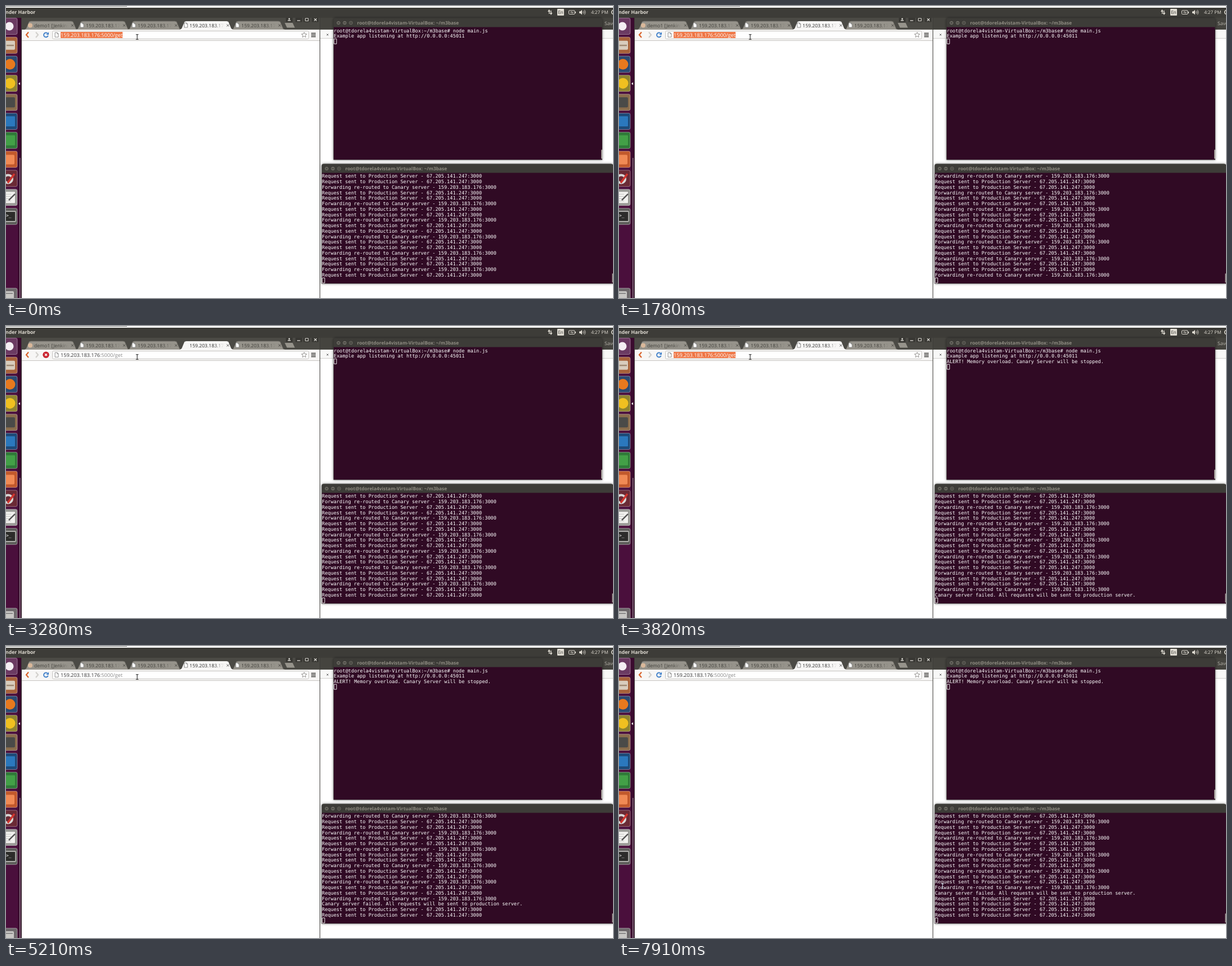
An HTML page with a canvas that plays this animation: 1078 by 519 pixels, repeating every 8 s.

```html
<!DOCTYPE html>
<html lang="en">
<head>
<meta charset="utf-8">
<title>Canary release demo</title>
<style>
html, body { margin: 0; width: 100%; height: 100%; overflow: hidden; background: #fff; }
canvas { display: block; }
</style>
</head>
<body>
<canvas id="stage" width="1078" height="519"></canvas>
<script>
const ctx = document.getElementById('stage').getContext('2d');
ctx.textRendering = 'geometricPrecision';

const LOOP = 8000;
const SANS = '"Open Sans", "Noto Sans", sans-serif';
const MONO = '"DejaVu Sans Mono", monospace';
const BAR = '#3d3c38', PURPLE = '#300a24';
const HOST = 'root@tdorela4vistam-VirtualBox:';
const IP = '159.203.183.176';
const ROW = 9.75, FAIL_LINE = 24, ALERT_AT = 3820;

// Address bar state over time
const ADDRESS = [
  [0, 'selected'], [710, 'caret'], [990, 'plain'], [1130, 'selected'],
  [1390, 'loading'], [1510, 'plain'], [1780, 'selected'], [1900, 'caret'],
  [2330, 'plain'], [2460, 'selected'], [2600, 'plain'], [2730, 'caret'],
  [2880, 'plain'], [3030, 'selected'], [3280, 'loading'], [3420, 'plain'],
  [3550, 'selected'], [4100, 'loading'], [4230, 'plain'], [4790, 'selected'],
  [5070, 'loading'], [5210, 'plain'], [5330, 'caret'], [5460, 'selected'],
  [5730, 'loading'], [5870, 'plain'], [6120, 'selected'], [6840, 'loading'],
  [6970, 'plain']
];
// Moments at which a new log line arrives
const LOG_TIMES = [710, 1510, 1900, 2730, 3420, 3820, 4230, 5210, 5870, 6970];
// Pointer: time, x, y
const POINTER = [
  [0, 233, 55], [7270, 300, 112], [7390, 430, 230], [7520, 556, 344],
  [7640, 639, 415], [7790, 612, 461], [7910, 574.5, 427]
];

const latest = (list, t) => list.filter(e => e[0] <= t).pop();

function rect(x, y, w, h, color) {
  ctx.fillStyle = color;
  ctx.fillRect(x, y, w, h);
}

function round(x, y, w, h, r, fill, stroke, lw = 1) {
  ctx.beginPath();
  ctx.roundRect(x, y, w, h, r);
  if (fill) { ctx.fillStyle = fill; ctx.fill(); }
  if (stroke) { ctx.strokeStyle = stroke; ctx.lineWidth = lw; ctx.stroke(); }
}

function disc(x, y, r, fill, stroke, lw = 1) {
  ctx.beginPath();
  ctx.arc(x, y, r, 0, Math.PI * 2);
  if (fill) { ctx.fillStyle = fill; ctx.fill(); }
  if (stroke) { ctx.strokeStyle = stroke; ctx.lineWidth = lw; ctx.stroke(); }
}

function trace(points) {
  ctx.beginPath();
  points.forEach(([x, y], i) => i ? ctx.lineTo(x, y) : ctx.moveTo(x, y));
}

function poly(points, color) {
  trace(points);
  ctx.closePath();
  ctx.fillStyle = color;
  ctx.fill();
}

function line(points, color, lw = 1) {
  trace(points);
  ctx.strokeStyle = color;
  ctx.lineWidth = lw;
  ctx.stroke();
}

function cross(x, y, r, color, lw = 1) {
  line([[x - r, y - r], [x + r, y + r]], color, lw);
  line([[x + r, y - r], [x - r, y + r]], color, lw);
}

function text(s, x, y, size, color, family = SANS, weight = 400) {
  ctx.font = `${weight} ${size}px ${family}`;
  ctx.fillStyle = color;
  ctx.fillText(s, x, y);
}

const mono = (s, x, y) => text(s, x, y, 8.582, '#fff', MONO);

function page(x, y) {
  poly([[x - 3, y - 4], [x + 1, y - 4], [x + 3, y - 2], [x + 3, y + 4], [x - 3, y + 4]], '#fbfbfa');
  line([[x + 1, y - 4], [x - 3, y - 4], [x - 3, y + 4], [x + 3, y + 4], [x + 3, y - 2], [x + 1, y - 4], [x + 1, y - 2], [x + 3, y - 2]], '#777', .8);
}

function topBar() {
  rect(0, 0, 1078, 4, '#fff');
  rect(0, 0, 215, 1, '#777');
  rect(0, 3, 1078, 18, BAR);
  text('nder Harbor', -1, 14, 8.7, '#dfdbd2', SANS, 700);
  const c = '#dfdbd2';
  poly([[962, 10], [964.5, 6], [967, 10]], c);
  rect(964, 9, 1.3, 5, c);
  poly([[965.5, 12], [968, 16], [970.5, 12]], c);
  rect(967.3, 8, 1.3, 5, c);
  round(979, 5, 12, 12, 1, c);
  text('En', 980.4, 14, 8, BAR);
  round(999.5, 8, 10.5, 6.5, 1, null, c);
  rect(1010.5, 10, 1.5, 3, c);
  line([[1002, 11.5], [1005, 10], [1005, 12.5], [1008, 11]], c, .9);
  poly([[1018, 9.5], [1020, 9.5], [1023, 7], [1023, 15.5], [1020, 13], [1018, 13]], c);
  for (const r of [2, 4, 6]) {
    ctx.beginPath();
    ctx.arc(1023, 11.2, r, -.8, .8);
    ctx.strokeStyle = c;
    ctx.lineWidth = .8;
    ctx.stroke();
  }
  text('4:27 PM', 1039, 14, 8.2, c);
  disc(1079, 11, 3.5, null, c, 1.5);
}

function tile(y, color) {
  round(-10, y - 14.5, 30, 29, 3, color, 'rgba(255,255,255,.35)');
}

function launcher() {
  rect(0, 20, 28, 499, '#3b0b2f');
  rect(0, 20, 21, 499, '#4a0f3c');
  rect(24, 270, 1.5, 249, '#8d7d88');
  const colors = ['#6b3a62', '#a8623a', '#2b4a72', '#8f8430', '#8a6c4c', '#1e4a78',
    '#2f7a38', '#c2592c', '#6a2a35', '#9a9a96', '#5d5d5a'];
  const at = i => 36 + i * 33.8;
  colors.forEach((c, i) => tile(at(i), c));

  disc(6, at(0), 7.5, '#f4eef2');
  round(-2, at(1) - 8, 18, 16, 2, '#d9cdbd');
  rect(1, at(1) - 1, 13, 2.5, '#a08a74');
  disc(7, at(2), 9.5, '#e8791e');
  disc(7, at(3), 9.5, '#f0c020');
  round(-2, at(4) - 9, 18, 18, 2, '#4a4a48');
  round(-2, at(5) - 9, 18, 18, 1, '#2b78bd');
  round(-2, at(6) - 9, 18, 18, 1, '#43a047');
  round(-2, at(7) - 8, 17, 17, 2, '#f08a55');

  disc(4, at(8) + 1, 7, null, '#d8d8d6', 4);
  line([[3, at(8) + 8], [15, at(8) - 8]], '#d0352e', 3.5);
  round(-4, at(9) - 10, 20, 20, 1, '#f1f1ee');
  for (let k = -6; k < 8; k += 4) rect(0, at(9) + k, 9, .8, '#bbb');
  line([[5, at(9) + 5], [16, at(9) - 6]], '#555', 2.5);
  round(-4, at(10) - 9, 21, 18, 1, '#2c2c2a', '#d0d0cc', 1.3);
  text('>_', 0, at(10) + 1, 8, '#fff', MONO);

  poly([[22, 138], [25, 135.5], [25, 140.5]], '#eee');
  tile(516, '#6e6a6c');
  round(-3, 507, 17, 14, 2, '#c9c8c5');
  rect(-1, 510, 13, 1.5, '#777');
}

function tab(x, active) {
  poly([[x, 42], [x + 3, 40], [x + 8, 28], [x + 11, 27], [x + 83, 27], [x + 86, 28], [x + 91, 40], [x + 94, 42]],
    active ? '#f7f6f5' : '#96938b');
  if (!active) line([[x + 8, 28], [x + 11, 27], [x + 83, 27], [x + 86, 28], [x + 92, 42]], '#6b6962', .8);
  cross(x + 85, 34.5, 2, active ? '#555' : '#4a4944', 1);
}

function tabTitle(s, x, color) {
  const fade = ctx.createLinearGradient(x + 44, 0, x + 61, 0);
  fade.addColorStop(0, color);
  fade.addColorStop(1, color + '00');
  text(s, x, 37.5, 8.6, fade);
}

function chevron(x, dir, color) {
  line([[x + 2 * dir, 46.5], [x - 2 * dir, 51.3], [x + 2 * dir, 56]], color, 2.2);
}

function browser(state) {
  const loading = state === 'loading';
  rect(27, 20, 531, 499, BAR);
  rect(28, 21, 529, 21, '#4b4a45');
  rect(28, 62, 529, 457, '#fff');
  rect(28, 42, 529, 20, '#f7f6f5');
  rect(28, 61, 529, 1, '#c6c4c0');

  [33, 125, 217, 401].forEach(x => tab(x, false));
  tab(309, true);
  disc(43, 34.5, 4, '#d9b89a');
  tabTitle('demo1 [Jenkins]', 50, '#3f3e39');
  for (const x of [135, 227, 411]) {
    page(x, 34);
    tabTitle(IP, x + 7, '#3f3e39');
  }
  if (!loading) page(319.5, 34);
  tabTitle(IP, 326, '#2d2d2d');
  poly([[495, 30], [509, 30], [513, 38.5], [499, 38.5]], '#96938b');

  const c = '#dedcd6';
  for (const x of [503, 520, 534, 549]) round(x - 6, 19.5, 12, 9, 1, '#383733');
  disc(503, 23, 1.4, c);
  rect(500.5, 25, 5, 1.5, c);
  rect(517, 25.3, 5.5, 1.3, c);
  round(531.5, 22, 5.5, 4.5, 0, null, c);
  cross(549.5, 24.3, 2.2, c, 1.2);

  chevron(38, 1, '#d9622b');
  chevron(55, -1, '#d3d1cd');
  if (loading) {
    disc(71, 51.3, 5.7, '#c9202c');
    cross(71, 51.3, 2, '#fff', 1.5);
  } else {
    ctx.beginPath();
    ctx.arc(71, 51.4, 3.9, .3, 5.4);
    ctx.strokeStyle = '#3f7fca';
    ctx.lineWidth = 1.9;
    ctx.stroke();
    poly([[76, 46.3], [76, 51], [71.3, 51]], '#3f7fca');
  }
  address(state);

  trace([...Array(11).keys()].map(i => {
    const a = -Math.PI / 2 + i * Math.PI / 5, r = i % 2 ? 2.3 : 5;
    return [529.5 + r * Math.cos(a), 51.5 + r * Math.sin(a)];
  }));
  ctx.strokeStyle = '#85837f';
  ctx.lineWidth = .9;
  ctx.stroke();
  for (const y of [47.7, 50.7, 53.7]) rect(542, y, 8, 1.6, '#3f3f3d');
}

function address(state) {
  round(82.5, 44.5, 455, 14, 2, '#fff', '#c4c2be');
  page(90, 51.3);
  const selected = state === 'selected';
  if (selected) rect(97, 46, 110, 11, '#ee7443');
  text(IP, 97, 54.6, 9.13, selected ? '#fff' : '#333');
  const w = ctx.measureText(IP).width;
  text(':5000/get', 97 + w, 54.6, 9.13, selected ? '#fff' : '#8a8a8a');
  if (state === 'caret') rect(206, 46, 1, 11, '#222');
}

function backWindow() {
  rect(558, 20, 520, 499, '#fff');
  rect(558, 20, 520, 22, '#45443f');
  rect(558, 42, 520, 15, '#f8f8f7');
  rect(558, 57, 520, 1, '#d2d1ce');
  cross(571, 51, 1.5, '#555', .9);
  text('Save', 1063, 33.5, 8.6, '#b5b2aa');
}

function terminal(x, y, w, h) {
  ctx.save();
  ctx.shadowColor = 'rgba(0,0,0,.5)';
  ctx.shadowBlur = 4;
  round(x, y, w, h, [4, 4, 0, 0], BAR);
  ctx.restore();
  rect(x + .5, y + 16, w - 1, h - 16.5, PURPLE);
  for (let i = 0; i < 3; i++) {
    const cx = x + 9 + i * 11, cy = y + 8.5;
    disc(cx, cy, 4, '#6a6861', '#2e2d2a', .8);
    if (i === 0) cross(cx, cy, 1.5, '#32312e', .9);
    if (i === 1) rect(cx - 2, cy - .5, 4, 1, '#32312e');
    if (i === 2) round(cx - 1.5, cy - 1.5, 3, 3, 0, null, '#32312e', .9);
  }
  text(HOST + ' ~/m3base', x + 42, y + 11.7, 8.38, '#8f8c82', SANS, 700);
  rect(x + w - 2, y + h - 18, 2, 16, '#aaa59f');
}

const block = (x, y) => round(x + .5, y + .5, 4.5, 9, 0, null, '#fff', .9);

function appTerminal(t) {
  terminal(581.5, 21.5, 477.5, 252);
  const rows = [HOST + '~/m3base# node main.js', 'Example app listening at http://0.0.0.0:45011'];
  if (t >= ALERT_AT) rows.push('ALERT! Memory overload. Canary Server will be stopped.');
  rows.forEach((s, i) => mono(s, 582, 46.6 + i * ROW));
  block(582, 38.3 + rows.length * ROW);
}

function logLine(n) {
  if (n === FAIL_LINE) return 'Canary server failed. All requests will be sent to production server.';
  return n < FAIL_LINE && n % 3 === 2
    ? `Forwarding re-routed to Canary server - ${IP}:3000`
    : 'Request sent to Production Server - 67.205.141.247:3000';
}

function proxyTerminal(t) {
  terminal(560.5, 280.5, 518, 213);
  const top = LOG_TIMES.filter(at => at <= t).length;
  for (let i = 0; i < 19; i++) mono(logLine(top + i), 561, 305.4 + i * ROW);
  block(561, 482.7);
}

function pointer(t) {
  const [, x, y] = latest(POINTER, t);
  if (x > 240 && x < 558) {
    poly([[x, y], [x, y + 10], [x + 2.4, y + 8], [x + 4, y + 11], [x + 5.4, y + 10.3], [x + 4, y + 7.2], [x + 7, y + 7]], '#111');
    return;
  }
  const color = x < 558 ? '#222' : '#b9c6d2';
  line([[x, y - 4], [x, y + 4]], color, 1.1);
  for (const dy of [-4.3, 4.3]) line([[x - 2.3, y + dy], [x + 2.3, y + dy]], color, 1);
}

function draw(t) {
  backWindow();
  launcher();
  browser(latest(ADDRESS, t)[1]);
  topBar();
  appTerminal(t);
  proxyTerminal(t);
  pointer(t);
}

const start = performance.now();
function tick() {
  draw((performance.now() - start) % LOOP);
  requestAnimationFrame(tick);
}
tick();
</script>
</body>
</html>
```
